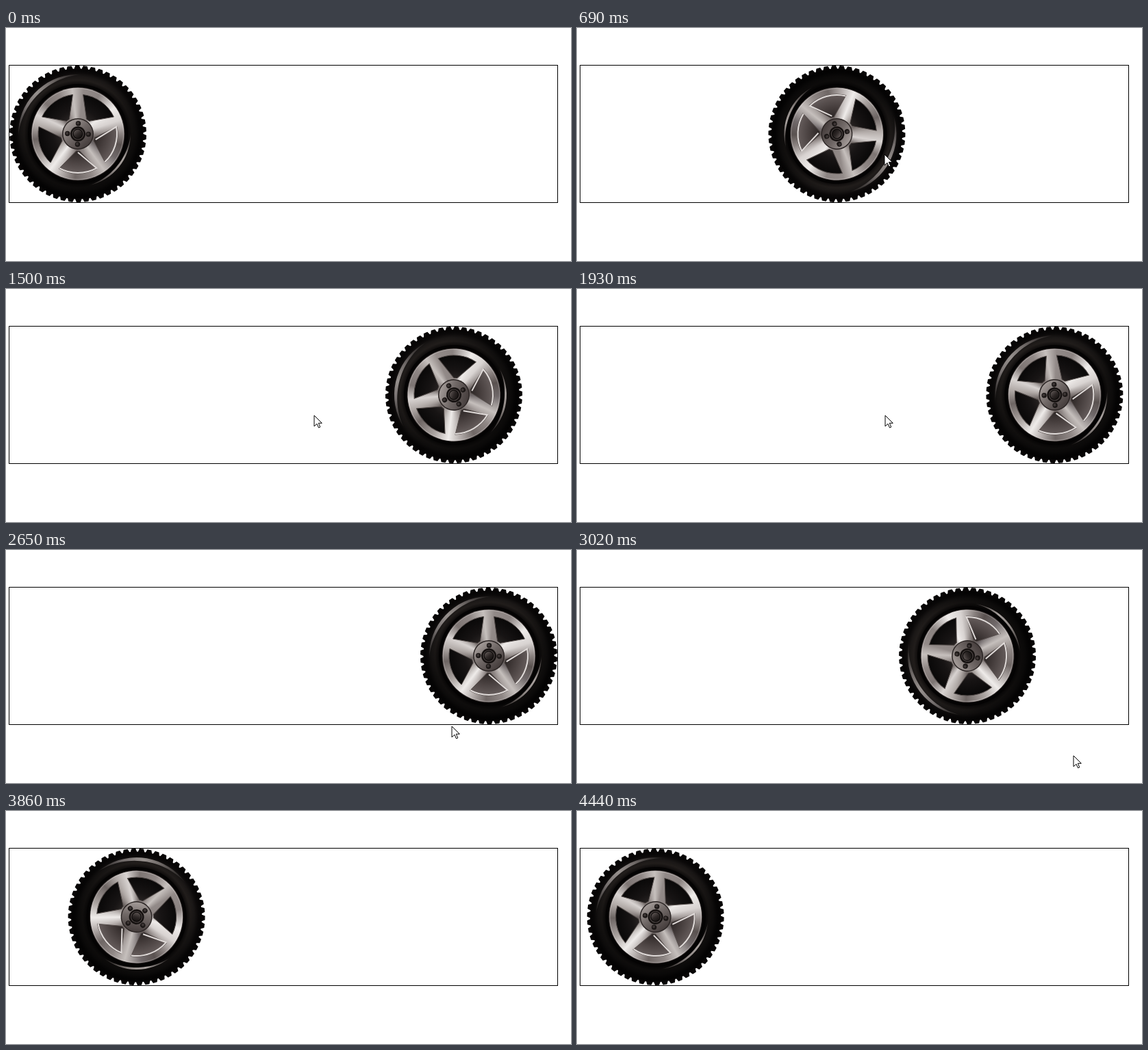
These frames come from a looping animation (825 px wide and 341 px high, 4.48 s). An HTML page with a canvas:

```html
<!DOCTYPE html>
<html lang="en">
<head>
<meta charset="utf-8">
<title>Rolling wheel</title>
<style>
  html, body { margin: 0; width: 100%; height: 100%; overflow: hidden; background: #fff; }
  canvas { display: block; }
</style>
</head>
<body>
<canvas id="stage" width="825" height="341"></canvas>
<script>
const ctx = document.getElementById('stage').getContext('2d');
const LOOP = 4480, TAU = Math.PI * 2, TEETH = 54;
const rad = deg => deg * Math.PI / 180;

// The CSS "ease" curve, cubic-bezier(.25, .1, .25, 1)
function ease(x) {
  if (x <= 0) return 0;
  if (x >= 1) return 1;
  let lo = 0, hi = 1, s;
  for (let i = 0; i < 24; i++) {
    s = (lo + hi) / 2;
    if (.75 * s * (1 - s) + s ** 3 < x) lo = s; else hi = s;
  }
  return .3 * s * (1 - s) ** 2 + 3 * s * s * (1 - s) + s ** 3;
}

// Pointer path: step, x, y
const pointerPath = [
  [0, 664, 296], [1, 640, 250], [5, 500, 192], [8, 449, 185], [20, 449, 185],
  [26, 448, 185], [34, 448, 185], [38, 450, 185], [62, 450, 185],
  [71, 651, 258], [74, 682, 276], [91, 786, 336], [93, 796, 343]
];

function pointerAt(step) {
  const i = pointerPath.findIndex(p => p[0] > step);
  if (i < 1) return null;
  const [a, ax, ay] = pointerPath[i - 1], [b, bx, by] = pointerPath[i];
  const k = (step - a) / (b - a);
  return [Math.round(ax + (bx - ax) * k), Math.round(ay + (by - ay) * k)];
}

function gradient(g, stops) {
  stops.forEach(([at, color]) => g.addColorStop(at, color));
  return g;
}
const radial = (r0, r1, stops, x = 0, y = 0) =>
  gradient(ctx.createRadialGradient(x, y, r0, 0, 0, r1), stops);
const linear = (x0, y0, x1, y1, stops) =>
  gradient(ctx.createLinearGradient(x0, y0, x1, y1), stops);

function disc(r, fill, x = 0, y = 0) {
  ctx.beginPath();
  ctx.arc(x, y, r, 0, TAU);
  ctx.fillStyle = fill;
  ctx.fill();
}

// Crescent between two arcs that meet at both ends
function crescent(r, from, to, thick, fill) {
  ctx.beginPath();
  ctx.arc(0, 0, r, rad(from), rad(to));
  for (let i = 0; i <= 30; i++) {
    const a = rad(to + (from - to) * i / 30), d = r - thick * Math.sin(Math.PI * i / 30);
    ctx.lineTo(d * Math.cos(a), d * Math.sin(a));
  }
  ctx.fillStyle = fill;
  ctx.fill();
}

const tread = new Path2D();
for (let i = 0; i < TEETH; i++) {
  [[0, 95.5], [.17, 100], [.68, 100], [.85, 95.5]].forEach(([k, r]) => {
    const a = (i + k) / TEETH * TAU;
    tread.lineTo(r * Math.cos(a), r * Math.sin(a));
  });
}
tread.closePath();

const metal = gradient(ctx.createConicGradient(0, 0, 0), [
  [0, '#8b8381'], [.04, '#5a5250'], [.09, '#70696a'], [.15, '#c5bfbc'], [.2, '#8f8785'],
  [.26, '#6f6765'], [.31, '#b3acaa'], [.355, '#efecea'], [.41, '#aaa3a0'], [.48, '#6d6563'],
  [.53, '#b0a9a6'], [.57, '#d8d3d1'], [.62, '#7d7573'], [.68, '#8f8785'], [.73, '#c6c0bd'],
  [.77, '#928a88'], [.83, '#8b8381'], [.9, '#eeebe9'], [.95, '#d8d3d1'], [1, '#8b8381']
]);

function windowPane(mid, lit) {
  const a = rad(mid - 28.5), b = rad(mid + 28.5), m = rad(mid);
  const inner = 25;
  const path = new Path2D();
  path.moveTo(inner * Math.cos(m - .1), inner * Math.sin(m - .1));
  path.arc(0, 0, 58, a, b);
  path.lineTo(inner * Math.cos(m + .1), inner * Math.sin(m + .1));
  path.closePath();
  ctx.fillStyle = lit
    ? radial(20, 60, [[0, '#231e1d'], [.45, '#443c3b'], [1, '#6a6160']])
    : radial(20, 60, [[0, '#2c2726'], [.4, '#171414'], [1, '#080707']]);
  ctx.fill(path);
  ctx.lineWidth = 1;
  ctx.strokeStyle = lit ? '#544c4a' : '#4c4543';
  ctx.stroke(path);
  if (!lit) return;
  const edge = lit === 1 ? a : b;
  ctx.beginPath();
  if (lit === 1) {
    ctx.moveTo(27 * Math.cos(m), 27 * Math.sin(m));
    ctx.lineTo(57 * Math.cos(edge), 57 * Math.sin(edge));
  }
  ctx.arc(0, 0, 57, a, b);
  ctx.lineWidth = 2;
  ctx.strokeStyle = '#e0dbd9';
  ctx.stroke();
}

function drawWheel(x, angle) {
  ctx.save();
  ctx.translate(x, 155);
  ctx.rotate(angle);

  ctx.fillStyle = '#070505';
  ctx.fill(tread);
  disc(94, radial(66, 94, [[0, '#050404'], [.2, '#0b0909'], [.45, '#211d1b'], [.65, '#1a1716'], [.85, '#0b0909'], [1, '#060505']]));
  // darker lower half of the sidewall
  disc(94, linear(-20, -60, 25, 90, [[0, 'rgba(0,0,0,0)'], [.45, 'rgba(0,0,0,.45)'], [1, 'rgba(0,0,0,.65)']]));
  crescent(87, 178, 274, 5, linear(-86, 5, 5, -86, [[0, '#191615'], [.3, '#777170'], [.5, '#96908d'], [.7, '#706a68'], [1, '#191615']]));
  crescent(77, 0, 78, 3, linear(77, 0, 16, 75, [[0, '#2a2523'], [.35, '#a8a19e'], [.6, '#8d8683'], [1, '#1a1615']]));

  disc(73, '#040303');
  disc(68.5, '#2b2625');
  disc(67.5, metal);
  ctx.beginPath();
  ctx.arc(0, 0, 66.7, 0, TAU);
  ctx.lineWidth = 1;
  ctx.strokeStyle = 'rgba(235,230,228,.35)';
  ctx.stroke();

  windowPane(-126, 0);
  windowPane(-54, 0);
  windowPane(162, 0);
  windowPane(18, 1);
  windowPane(90, 2 - 1);

  // hub, bolts and cap
  disc(23, '#2b2524');
  disc(21.5, linear(-15, -16, 15, 16, [[0, '#a49c99'], [.45, '#716967'], [1, '#453d3c']]));
  for (let i = 0; i < 4; i++) {
    const a = rad(i * 90 + 2), bx = 15.3 * Math.cos(a), by = 15.3 * Math.sin(a);
    disc(3.7, '#1b1716', bx, by);
    disc(2, '#3d3635', bx - .5, by - .5);
  }
  disc(11, '#151110');
  disc(8.6, '#4c4443');
  disc(7.4, '#0b0908');
  disc(6.2, linear(-4, -5, 4, 5, [[0, '#5b5351'], [.5, '#2f2928'], [1, '#171312']]));
  ctx.restore();
}

const arrow = new Path2D('M.5 .5V16.5L4.5 12.8L7 18.5L9.3 17.5L6.8 11.8H11.8Z');

function drawPointer([x, y]) {
  ctx.save();
  ctx.translate(x - .5, y - .5);
  ctx.fillStyle = '#fff';
  ctx.fill(arrow);
  ctx.lineWidth = 1;
  ctx.strokeStyle = '#000';
  ctx.stroke(arrow);
  ctx.restore();
}

function draw(ms) {
  // The picture advances in steps of about 36 ms
  const step = Math.min(120, Math.floor((ms - 68) / 36.36));
  const roll = step < 71.14
    ? ease((step - 1.03) * .01707)
    : 1 - ease((step - 71.14) * .0171);
  ctx.fillStyle = '#fff';
  ctx.fillRect(0, 0, 825, 341);
  drawWheel(105 + 600 * roll, TAU * roll);
  ctx.lineWidth = 1;
  ctx.strokeStyle = '#000';
  ctx.strokeRect(4.5, 54.5, 801, 201);
  const pointer = pointerAt(step);
  if (pointer) drawPointer(pointer);
}

let start;
function tick(now) {
  start ??= now;
  draw((now - start) % LOOP);
  requestAnimationFrame(tick);
}
requestAnimationFrame(tick);
</script>
</body>
</html>
```
